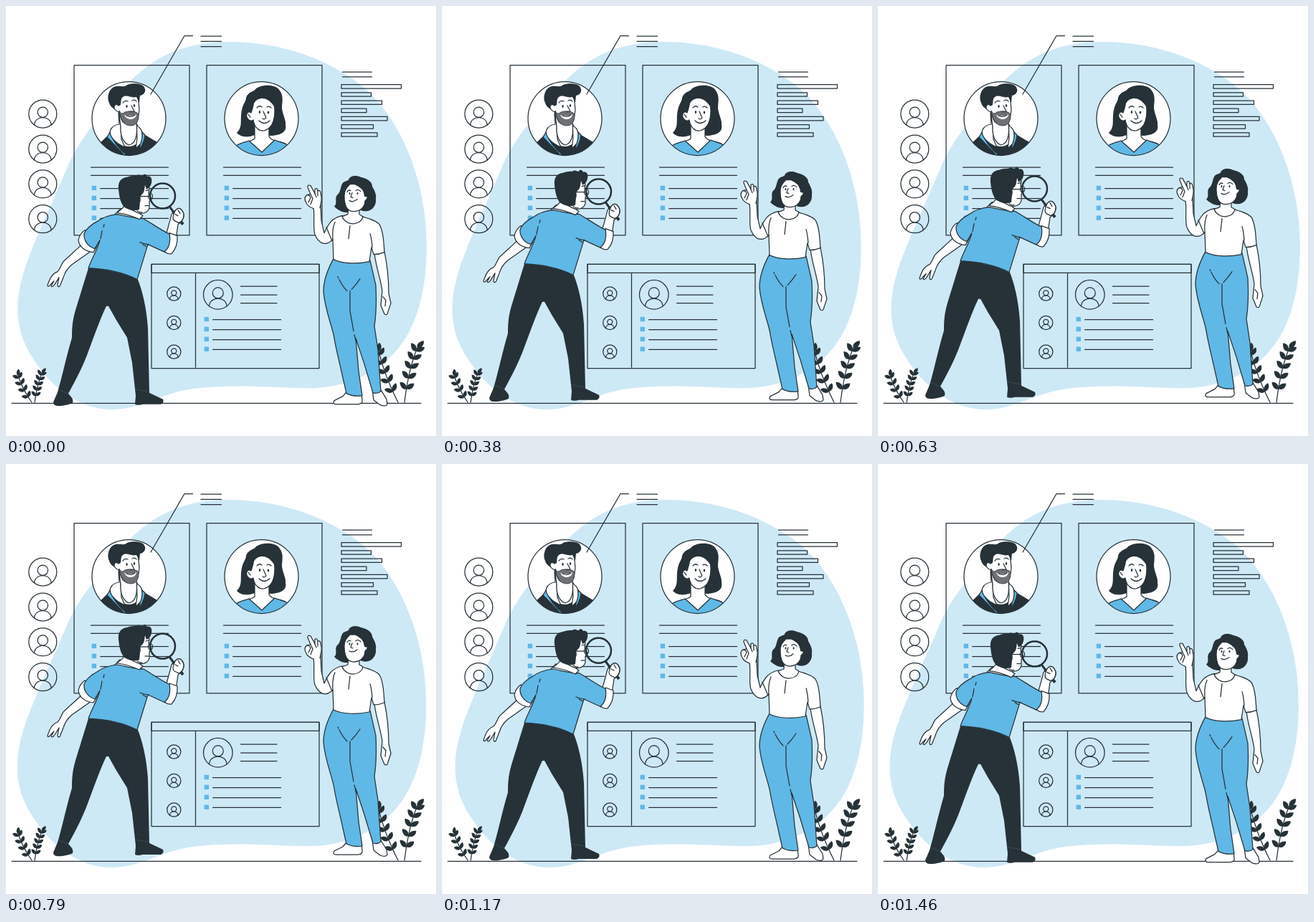
An HTML page for the animation above (1.5 s loop, 600x600 px).

```html
<!DOCTYPE html>
<html lang="en">
<head>
<meta charset="utf-8">
<title>Comparing profiles</title>
<style>
html, body { margin: 0; width: 100%; height: 100%; overflow: hidden; background: #fff; }
svg { display: block; width: 100vw; height: 100vh; }
.ln { fill: none; stroke: #263238; stroke-width: 1.25; stroke-linecap: round; stroke-linejoin: round; }
.sk { fill: #fff; stroke: #263238; stroke-width: 1.25; stroke-linecap: round; stroke-linejoin: round; }
.bl { fill: #60b8e6; stroke: #263238; stroke-width: 1.25; stroke-linejoin: round; }
.dk { fill: #263238; }
.dot { fill: #60b8e6; }
</style>
</head>
<body>
<svg viewBox="0 0 600 600">
  <defs>
    <clipPath id="c1"><circle cx="171.5" cy="157" r="51.5"/></clipPath>
    <clipPath id="c2"><circle cx="356.5" cy="157" r="51.5"/></clipPath>
  </defs>

  <path id="blob" fill="#cee9f6" d="M318 50C252 48 202 70 162 118C132 155 107 178 87 222C67 270 40 325 26 368C11 415 13 455 38 492C62 530 100 563 148 563C190 563 215 540 262 534C330 526 390 535 432 533C490 530 540 502 565 450C590 398 590 330 583 282C574 220 545 150 495 110C450 75 390 52 318 50Z"/>

  <g id="board"></g>
  <path class="ln" d="M8 554.3H579"/>

  <!-- portrait: bearded man -->
  <g clip-path="url(#c1)">
    <circle cx="171.5" cy="157" r="51.5" fill="#fff"/>
    <path class="dk" d="M126 196L146 177C150 189 160 195 172 196C182 195 188 189 191 178L216 193V212H126Z"/>
    <path class="bl" d="M145 176L141 183L164 207L170 209Q152 196 145 176ZM190 176L194 180Q193 194 180 208L186 200Z"/>
    <path class="sk" d="M157 150L158 165C149 166 143 173 146 180C150 189 158 193 166 197L161 186L160 165ZM182 164L184 168C191 172 191 182 188 192L181 199L183 184Z"/>
    <path class="sk" d="M157 145L160 168C159 183 165 192 172 194C180 192 184 182 182 163Z"/>
    <path class="sk" d="M156 132C150 134 149 143 157 147L161 158C165 168 181 168 184 158L186 145L184 124L160 124Z"/>
    <path fill="#6f7173" stroke="#263238" stroke-width=".8" d="M158 146C161 152 163 150 166 148Q175 145 183 149L185 151C185 159 183 167 174 167C164 167 160 158 158 146Z"/>
    <path fill="#fff" d="M165 152Q174 155 182 151Q181 158 174 158Q168 158 165 152Z"/>
    <path class="ln" d="M168 153Q175 156 180 152M175 139L179 147L174 148M163 135Q166 131 170 133M176 132Q180 130 182 133"/>
    <path class="dk" d="M157 148C152 144 145 141 144 135C140 127 144 113 154 112C161 111 165 114 169 110C176 107 189 108 192 112C197 118 193 124 187 125L186 135L182 127C174 129 169 123 163 127C158 131 163 140 157 139Z"/>
    <ellipse class="dk" cx="168.500" cy="140" rx="1.200" ry="2"/><ellipse class="dk" cx="179" cy="139" rx="1.200" ry="2"/>
    <path class="sk" d="M157 139C151 134 147 143 157 148"/>
  </g>
  <circle class="ln" cx="171.500" cy="157" r="51.500"/>

  <!-- portrait: woman -->
  <g clip-path="url(#c2)">
    <circle cx="356.5" cy="157" r="51.5" fill="#fff"/>
    <path class="dk" d="M322 177C331 168 326 160 329 145C331 136 335 133 335 128C338 119 346 120 349 115C358 109 377 109 382 118C388 126 385 135 385 143C387 154 391 160 390 166C392 173 387 180 371 181L347 180C338 184 327 183 322 177Z"/>
    <path class="sk" d="M347 163L347 185C343 189 332 190 325 193L357 212L390 192C380 188 370 189 367 182L367 166Z"/>
    <path class="bl" d="M318 197C325 191 334 190 339 188L357 204L375 187C382 190 390 191 396 196L395 212H318Z"/>
    <path class="sk" d="M345 132C346 141 343 145 342 149C336 145 333 154 339 159C342 161 344 160 345 159C347 170 353 175 360 174C371 171 375 159 375 146C375 136 371 128 362 127C354 126 350 129 345 132Z"/>
    <path class="dk" d="M341 149C340 136 341 128 350 125C356 120 369 121 374 130L376 142L370 135C362 126 350 128 346 136Z"/>
    <path class="ln" d="M350 142Q353 138 357 141M364 141Q367 139 370 142M359 147L363 156Q361 159 358 157M353 160Q360 167 368 160M338 151L341 155"/>
    <ellipse class="dk" cx="354" cy="148" rx="1.200" ry="2"/><ellipse class="dk" cx="366" cy="148.500" rx="1.200" ry="2"/>
  </g>
  <circle class="ln" cx="356.500" cy="157" r="51.500"/>
  <path class="ln" d="M260.500 41.500H249L202 123"/>

  <g id="plants"></g>

  <!-- man with magnifier -->
  <g id="man">
    <path class="sk" d="M107 332C99 340 88 349 80 357C77 361 76 367 72 371C64 374 61 381 58 390C58 393 61 391 62 389L67 384L63 391C65 394 68 389 71 384L74 379L72 389C72 393 75 393 76 389L80 379C82 372 86 366 92 361L119 342Z"/>
    <path class="sk" d="M110 313C104 317 102 322 101 327C102 337 111 343 122 344L127 335Z"/>
    <path class="sk" d="M229 299L224 317L237 326L240 305C246 301 249 296 248 290C246 284 242 281 238 284L231 291Z"/>
    <path class="dk" d="M115 366C110 382 104 402 99 418C93 436 92 447 92 463C84 490 79 515 72 539L66 553Q66 557 70 558C77 559 87 557 93 554Q94 550 92 547L87 541C96 525 108 502 115 482C123 461 132 435 140 419H143L153 437L169 463L176 498L181 544L180 556Q184 558 191 556L216 556Q221 554 219 549L200 540L199 495L198 450C196 420 190 397 184 382L150 362Z"/>
    <path d="M74 536L87 541M180 535L199 538" stroke="#46525a" stroke-width=".7"/>
    <path class="sk" d="M152 291L159 284L184 289L190 297L176 304Z"/>
    <path class="bl" d="M155 291C145 292 134 296 127 301C118 306 111 313 109 318C108 327 114 336 124 339L131 327C128 340 119 354 115 366C138 367 164 372 183 382L198 333L222 344C229 339 231 328 229 319C216 313 204 304 192 297C179 297 166 293 155 291Z"/>
    <path class="sk" d="M228 317L239 321Q240 336 231 346Q226 347 221 343Q231 336 228 317Z"/>
    <path class="ln" d="M187 330Q194 333 199 333M132 325L134 314M136 309L137 305M191 333L196 336"/>
    <path class="sk" d="M165 278C164 284 158 285 155 289Q171 291 186 298L191 293L184 288Z"/>
    <path class="sk" d="M194 249L200 254L199 261L203 269L200 273L200 281C199 288 192 291 184 289L170 282L176 259Z"/>
    <path class="dk" d="M157 256C156 246 160 240 169 239C174 237 179 237 182 237C187 234 188 238 191 237C192 234 196 235 197 238C203 237 204 242 203 247C202 252 199 255 196 256L194 250C193 257 193 261 189 264C186 267 189 271 187 274L186 284C181 287 171 285 165 281C159 274 158 265 157 256Z"/>
    <path class="ln" d="M188 266H200M190 288Q186 289 183 286M194 279L199 279"/>
    <ellipse class="ln" cx="201.500" cy="266" rx="3" ry="4.500"/>
    <path class="ln" d="M195 258L199 257"/>
    <circle cx="218.500" cy="265.300" r="17.500" fill="none" stroke="#263238" stroke-width="2.500"/>
    <path d="M228 280L236 291" stroke="#263238" stroke-width="3" fill="none"/>
    <path d="M233 287L247 305" stroke="#263238" stroke-width="4" fill="none"/>
    <path class="sk" d="M238 284C242 281 246 284 248 291C248 297 246 301 241 303L235 300C231 297 234 290 236 286Z"/>
    <path class="ln" d="M236 291L240 293M240 285L243 290"/>
  </g>

  <!-- woman -->
  <g id="woman">
    <path class="sk" d="M475 539L470 545L458 551Q455 556 461 556H492Q498 555 497 550L496 541ZM511 535L513 550L522 557Q530 560 532 556L531 549L523 536Z"/>
    <path class="sk" d="M514 345C516 364 523 382 525 398L523 418L528 430Q532 433 533 427L537 415L534 401C534 380 532 362 528 343Z"/>
    <path class="ln" d="M526 406L530 411L529 419"/>
    <path class="bl" d="M457 353C447 371 443 384 443 399C445 425 456 449 458 464C461 482 466 500 470 519L475 541Q485 546 497 544L492 510L488 464L500 500L512 540Q518 542 523 538L519 480L514 447C517 428 517 410 516 390L508 355Z"/>
    <path class="ln" d="M480 398L480 426Q483 443 485 454M486 459L488 467M465 382Q470 392 476 398M463 378L464 380M494 381Q488 390 482 396"/>
    <path class="sk" d="M469 293C455 296 450 304 444 317L440 300L439 278L429 281C431 296 428 310 431 319C436 331 446 337 456 326L457 354C471 361 493 360 507 357L510 337L513 347Q521 347 528 344C527 327 526 314 521 305C514 298 505 297 497 294Z"/>
    <path class="ln" d="M456 326Q455 311 459 302M511 337Q510 324 508 318M480 307L478 325M447 309Q452 321 455 328"/>
    <path class="dk" d="M478 243C479 237 489 236 495 239C505 241 511 246 511 252C515 259 517 264 516 269C517 278 512 284 506 286C499 288 493 285 490 282L481 287C472 291 463 285 458 280C463 276 458 269 462 264C468 260 466 250 471 246Z"/>
    <path class="sk" d="M478 279L477 291L469 294C472 301 479 305 486 304C493 303 497 299 498 294L493 291L493 281Z"/>
    <path class="sk" stroke-width=".8" d="M480 249C476 253 472 257 472 265C472 278 476 287 485 287C495 287 501 280 501 272C506 269 505 263 501 264C500 256 494 252 487 249Z"/>
    <path class="dk" d="M483 246C490 250 499 253 500 266L504 267L506 254L496 243Z"/>
    <path class="ln" d="M476 260Q478 256 481 258M488 258Q491 255 495 259M483 261L481 267L484 268M479 272Q485 275 490 270"/>
    <ellipse class="dk" cx="479.500" cy="262" rx="1" ry="1.700"/><ellipse class="dk" cx="490.500" cy="262" rx="1" ry="1.700"/>
    <path class="sk" d="M429 283C424 281 420 278 419 275C416 270 417 266 420 264L425 263L421 253Q421 249 425 251L431 262L431 256Q434 253 435 258Q439 257 439 262C442 270 439 276 438 282"/>
    <path class="ln" d="M420 264Q424 264 425 268L422 274M425 263L428 269L425 277M431 262L433 267M435 258L435 265"/>
  </g>
</svg>
<script>
const $ = id => document.getElementById(id);
const line = (x1, x2, y) => `<path class="ln" d="M${x1} ${y}H${x2}"/>`;
const rect = (x, y, w, h) => `<rect class="ln" x="${x}" y="${y}" width="${w}" height="${h}"/>`;
const bullets = (x, y, x2) => [0, 1, 2, 3].map(i =>
  `<rect class="dot" x="${x}" y="${y + i * 13.9 - 3.2}" width="6.4" height="6.4"/>` +
  line(x + 12, x2, y + i * 13.9 + .7)).join('');

function avatar(x, y, r) {
  const k = r / 19.5;
  return `<g class="ln" style="stroke-width:${1.25 / k}" transform="translate(${x} ${y}) scale(${k})">
    <circle r="19.5"/><circle cy="-2.3" r="7.2"/><path d="M-11.800 15.500C-11 1.500 11 1.500 11.800 15.500"/></g>`;
}

function card(x) {
  return rect(x, 82.6, 161, 237.2) + line(x + 23.5, x + 131.5, 225) +
    line(x + 23.5, x + 131.5, 236.3) + bullets(x + 24.7, 254, x + 131.5);
}

function board() {
  let s = card(95) + card(280);
  s += rect(203, 360.3, 234, 145.3) + rect(203, 360.3, 234, 12) + '<path class="ln" d="M264.500 372.500V504"/>';
  [150.5, 199.5, 248.3, 297.2].forEach(y => s += avatar(51.3, y, 19.5));
  [401.5, 442, 482.5].forEach(y => s += avatar(234.3, y, 9.6));
  s += avatar(295.8, 402.8, 20.3);
  [391, 403, 414.6].forEach(y => s += line(327.5, 378, y));
  s += bullets(276.6, 437, 383.5);
  [42, 49.3, 56.6].forEach(y => s += line(272, 300.5, y));
  [92, 98.8].forEach(y => s += line(469.5, 510.5, y));
  [83.5, 41.5, 56.5, 35, 64, 44.5, 50].forEach((w, i) => s += rect(468, 109.6 + i * 11.2, w, 5.4));
  return s;
}

// Curved stem with paired leaves from base a through b to tip c.
function plant(a, b, c, n, size) {
  const at = (u, k) => (1 - u) ** 2 * a[k] + 2 * u * (1 - u) * b[k] + u * u * c[k];
  const leaf = (x, y, ang) => `<path class="dk" transform="translate(${x} ${y}) rotate(${ang}) scale(${size})"
    d="M0 0C2 -5 9 -5 14 -1C11 4 4 5 0 0Z"/>`;
  let s = `<path class="ln" d="M${a}Q${b} ${c}"/>`;
  for (let i = 0; i < n; i++) {
    const u = .2 + .72 * i / (n - 1), x = at(u, 0), y = at(u, 1);
    const dir = Math.atan2(at(u + .02, 1) - y, at(u + .02, 0) - x) * 180 / Math.PI;
    s += leaf(x, y, dir - 48) + leaf(x, y, dir + 48);
  }
  const tip = Math.atan2(c[1] - b[1], c[0] - b[0]) * 180 / Math.PI;
  return s + leaf(c[0], c[1], tip + 22);
}

$('board').innerHTML = board();
$('plants').innerHTML =
  plant([556, 553], [562, 505], [574, 477], 5, .95) +
  plant([547, 553], [528, 515], [520, 482], 5, .88) +
  plant([36, 553], [23, 535], [17, 516], 4, .68) +
  plant([40, 553], [43, 530], [50, 512], 5, .62);

const LOOP = 1500, STEPS = 36, SCALE = 1.2;
const shake = [0, -1, 2, -4, 4, -4, 4, -4, 2, -1, 0];

function draw(ms) {
  const n = Math.floor((ms % LOOP + 5) * STEPS / LOOP) % STEPS;
  const u = (n + .5) / STEPS;
  const i = Math.floor(u * 10), f = u * 10 - i;
  const dx = SCALE * (shake[i] + (shake[i + 1] - shake[i]) * f);
  const dy = -10 * SCALE * (1 - Math.abs(2 * u - 1));
  $('blob').setAttribute('transform', `translate(${dx} 0)`);
  $('man').setAttribute('transform', `translate(0 ${dy})`);
  $('woman').setAttribute('transform', `translate(0 ${dy})`);
}

const start = performance.now();
function tick() {
  draw(performance.now() - start);
  requestAnimationFrame(tick);
}
tick();
</script>
</body>
</html>
```
